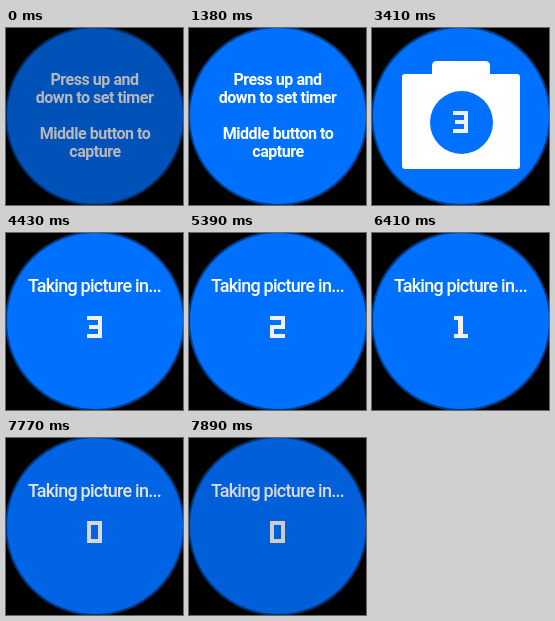
These frames come from a looping animation (177 by 177 pixels, 8 s). An HTML page:

```html
<!DOCTYPE html>
<html lang="en">
<head>
<meta charset="utf-8">
<title>Camera timer</title>
<style>
  html, body { margin: 0; width: 100%; height: 100%; overflow: hidden; background: #000; }
  svg { display: block; width: 100vw; height: 100vh; }
  text { fill: #fff; text-anchor: middle; font-family: Roboto, "Liberation Sans", sans-serif; }
  #intro { font-size: 16px; font-weight: 700; letter-spacing: -.45px; }
  #count { font-size: 18px; font-weight: 500; letter-spacing: -.75px; }
  #digit { fill: #f0f0f0; shape-rendering: crispEdges; }
</style>
</head>
<body>
<svg viewBox="0 0 177 177">
  <rect width="177" height="177" fill="#000"/>
  <circle cx="89" cy="88" r="89" fill="#0070ff" stroke="#003c86" stroke-width="2"/>
  <g id="intro">
    <text x="88.5" y="57">Press up and</text>
    <text x="88.5" y="75">down to set timer</text>
    <text x="89" y="111">Middle button to</text>
    <text x="89" y="129">capture</text>
  </g>
  <g id="camera" fill="#fff">
    <rect x="30" y="46" width="118" height="95" rx="3"/>
    <path d="M60 47V38Q60 33 65 33H113Q118 33 118 38V47Z"/>
    <circle cx="89.5" cy="94.5" r="31.5" fill="#0070ff"/>
  </g>
  <g id="count"><text x="88.5" y="59">Taking picture in...</text></g>
  <path id="digit" fill-rule="evenodd"/>
  <rect id="shade" width="177" height="177" fill="#000"/>
</svg>
<script>
  const LOOP = 8000;
  const DIGITS = [
    "M81 83h15v22h-15zM85 87v14h7v-14z",
    "M82 83h9v18h5v4h-14v-4h4v-14h-4z",
    "M81 83h15v13h-11v5h11v4h-15v-13h11v-5h-11z",
    "M81 83h15v22h-15v-4h11v-5h-9v-4h9v-5h-11z"
  ];
  // start time, scene, digit, shade
  const STEPS = [
    [0, "intro", null, .28],
    [1380, "intro", null, 0],
    [1440, "camera", 0, 0],
    [2460, "camera", 1, 0],
    [2930, "camera", 2, 0],
    [3410, "camera", 3, 0],
    [4430, "count", 3, 0],
    [5390, "count", 2, 0],
    [6410, "count", 1, 0],
    [7370, "count", 0, 0],
    [7660, "count", 0, .06],
    [7770, "count", 0, .105],
    [7890, "count", 0, .15]
  ];
  const el = id => document.getElementById(id);
  const scenes = ["intro", "camera", "count"].map(el);

  function draw(now) {
    const t = now % LOOP;
    const [, scene, digit, shade] = STEPS.findLast(s => s[0] <= t);
    for (const s of scenes) s.style.display = s.id === scene ? "" : "none";
    el("digit").setAttribute("d", digit === null ? "" : DIGITS[digit]);
    el("shade").setAttribute("opacity", shade);
  }

  const start = performance.now();
  function tick() {
    draw(performance.now() - start);
    requestAnimationFrame(tick);
  }
  tick();
</script>
</body>
</html>
```
